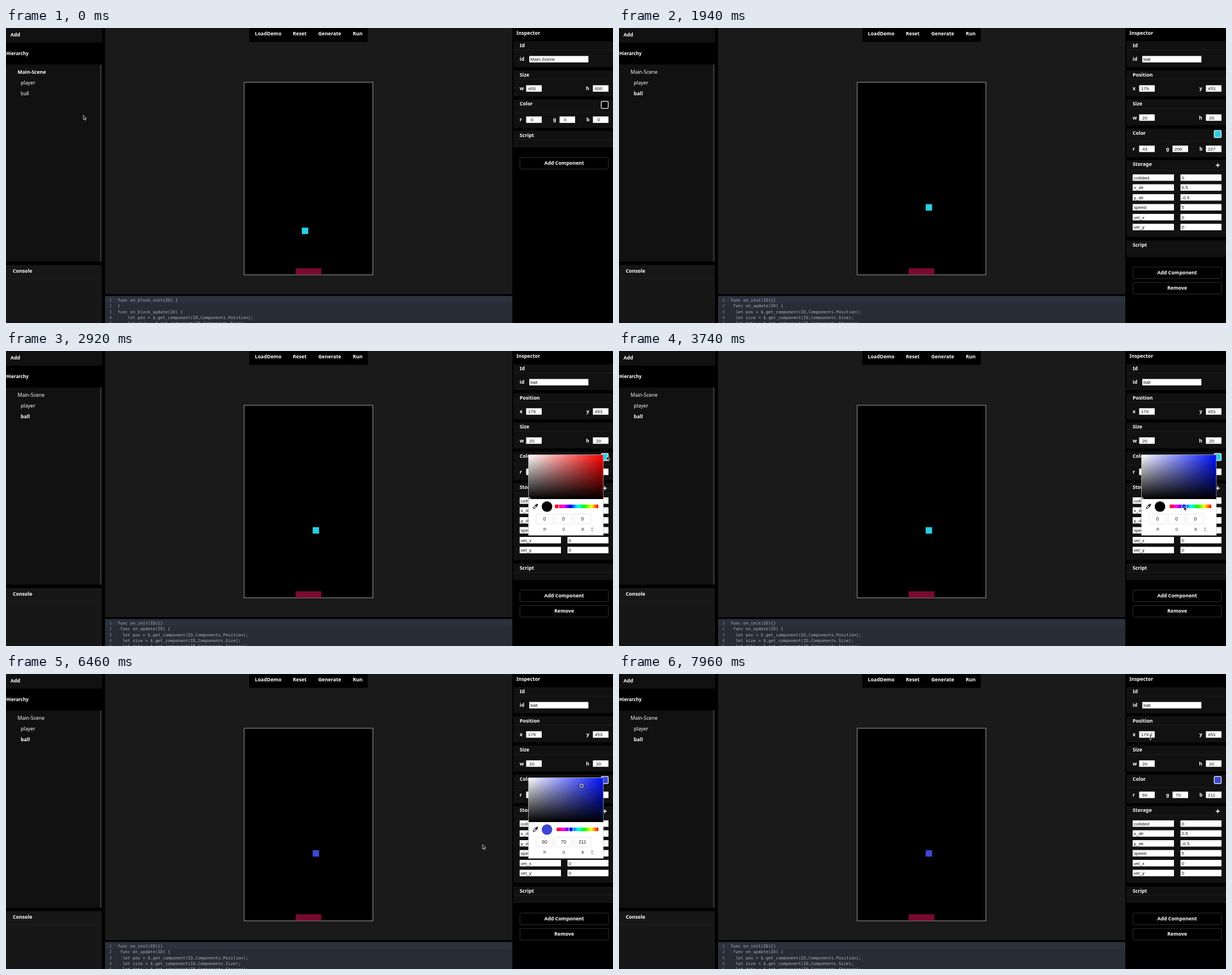
Write an HTML page that moves like this. It is 1073x522 px and loops after 8 s.

```html
<!DOCTYPE html>
<html lang="en">
<head>
<meta charset="utf-8">
<title>Block editor</title>
<style>
html, body { margin: 0; width: 100%; height: 100%; overflow: hidden; background: #000; }
svg { display: block; width: 100vw; height: 100vh; }
text { font: 8.75px "Noto Sans", "Open Sans", sans-serif; fill: #fff; white-space: pre; }
.bold { font-weight: 700; }
.small { font-size: 8.1px; font-weight: 700; }
.field { font: 8.1px "Liberation Sans", sans-serif; fill: #111; }
.value { font: 8.6px "Liberation Sans", sans-serif; fill: #222; }
.label { font: 7px "Liberation Sans", sans-serif; fill: #333; }
.code { font: 7.38px "DejaVu Sans Mono", monospace; fill: #abb2bf; }
.gutter { font: 7.38px "DejaVu Sans Mono", monospace; fill: #7d8799; }
</style>
</head>
<body>
<svg id="stage" viewBox="0 0 1073 522" preserveAspectRatio="none"></svg>
<script>
const LOOP = 8000, GRAB = 940, SELECT = 1065, DROP = 1940, APPEAR = 2420, OPEN = 2690;
const PICK = 4440, CLOSE = 6565, HOVER = 7940;

// The screen refreshes quickly until the ball is grabbed, then eight times a second.
function snap(t) {
  const gap = t < GRAB ? 40 : 125;
  return t < 220 ? 0 : GRAB + Math.floor((t - GRAB) / gap) * gap;
}

function glide(t, start, end, from, to) {
  const k = Math.max(0, Math.min(1, (t - start) / (end - start)));
  return from + (to - from) * k * k * (3 - 2 * k);
}

const hueAt = t => glide(t, 3440, 3690, 360, 236.05);
const shadeAt = t => t < PICK ? [0, 0]
  : [glide(t, 4815, 5065, .784, .7156), glide(t, 4815, 5065, .7725, .8275)];
const hueX = hue => 973.5 + 73.5 * (1 - hue / 360);
const shadeXY = ([s, v]) => [923.7 + s * 131, 184.3 + (1 - v) * 78];

// Each move: start, end, and the place the pointer glides to.
const MOVES = [
  [180, GRAB, 530, 359.5], [GRAB, 1190, 558, 340], [1190, DROP, 549.2, 318],
  [DROP, APPEAR, 1062, 186], [2940, 3400, 973.5, 275], [3740, PICK, ...shadeXY(shadeAt(PICK))],
  [5440, 6440, 842.7, 302], [CLOSE, 7565, 931, 175], [7600, HOVER, 939.5, 111.5]
];

function pointerAt(t) {
  if (t >= 3440 && t < 3740) return [hueX(hueAt(t)), 275];
  if (t >= PICK && t < 5440) return shadeXY(shadeAt(t));
  let place = [136.8, 154.5];
  for (const [start, end, x, y] of MOVES) {
    if (t < start) break;
    if (start === 3740) place = [hueX(hueAt(t)), 275];
    if (start === 5440) place = shadeXY(shadeAt(t));
    place = [glide(t, start, end, place[0], x), glide(t, start, end, place[1], y)];
  }
  return place;
}

function ballAt(t) {
  const [x, y] = pointerAt(Math.max(GRAB, Math.min(DROP - 1, t)));
  return [x - 1.4, y - .6];
}

function hsvToRgb(h, s, v) {
  return [5, 3, 1].map(n => {
    const k = (n + h / 60) % 6;
    return Math.round(255 * v * (1 - s * Math.max(0, Math.min(k, 4 - k, 1))));
  });
}

const css = rgb => `rgb(${rgb})`;
const box = (x, y, w, h, fill, extra = '') =>
  `<rect x="${x}" y="${y}" width="${w}" height="${h}" fill="${fill}" ${extra}/>`;
const text = (x, y, s, cls = 'bold', anchor = 'start') =>
  `<text x="${x}" y="${y + 3.1}" class="${cls}" text-anchor="${anchor}">${s}</text>`;
const field = (x, y, w, s) => box(x, y - 5.7, w, 11.4, '#fff') + text(x + 2, y - .2, s, 'field');
const number = (x, y, s) => box(x, y - 5.7, 27.5, 11.4, '#fff') + text(x + 10, y, s, 'field', 'middle');
const section = (title, y, height, line = 7.5) =>
  box(897, y - 7.7, 176, height, '#111') + box(897, y + line, 176, 1, '#1f1f1f') + text(908, y - .2, title);
const button = (y, s) =>
  box(908.5, y - 10, 156.5, 20.5, '#000', 'rx="2.5" stroke="#303030"') + text(986.7, y, s, 'bold', 'middle');
const pair = (y, a, va, b, vb) =>
  text(908, y, a) + number(919.5, y, va) + text(1031, y, b, 'bold', 'end') + number(1037.5, y, vb);

function editor(selected) {
  const code = selected
    ? ['func on_init(ID){}', ' func on_update(ID) {',
       '  let pos = $.get_component(ID,Components.Position);',
       '  let size = $.get_component(ID,Components.Size);',
       '  let data = $.get_component(ID,Components.Storage);']
    : ['func on_block_init(ID) {', '}', 'func on_block_update(ID) {',
       '    let pos = $.get_component(ID,Components.Position);',
       '    let size = $.get_component(ID,Components.Size);'];
  return box(175, 474, 720, 48, '#282c34') + box(175, 475.5, 720, 11, '#2b313d') +
    code.map((s, i) => {
      const y = 480.8 + i * 10.33;
      return text(187, y, i + 1, 'gutter', 'end') + text(197.3, y, s, 'code');
    }).join('');
}

function leftPanel(selected) {
  return box(0, 0, 170, 26, '#111') + text(8, 12.3, 'Add') + text(.5, 44.5, 'Hierarchy', 'small') +
    box(0, 64.5, 166, 349, '#111') + box(166, 64.5, 3.2, 349, '#2e2e2e') +
    text(20.5, 78, 'Main-Scene', selected ? '' : 'bold') + text(26, 97, 'player', '') +
    text(26, 115.5, 'ball', selected ? 'bold' : '') +
    box(0, 419.5, 169.5, 103, '#171717') + box(0, 443, 169.5, 1, '#1f1f1f') + text(12, 430, 'Console');
}

function scene(ball, color) {
  return box(175, 0, 720, 471, '#1a1a1a') + box(430, 0, 209.5, 24.5, '#000') +
    text(440, 9.5, 'LoadDemo') + text(507, 9.5, 'Reset') + text(552, 9.5, 'Generate') + text(613, 9.5, 'Run') +
    box(421, 96, 227.6, 340.8, '#000', 'stroke="#a0a0a0"') +
    box(512, 425.2, 45.5, 11.2, '#780a30') +
    box(ball[0] - 5.7, ball[1] - 5.7, 11.4, 11.4, css(color));
}

function colorSection(y, color) {
  return section('Color', y, 50.5, 14.5) +
    box(1052.2, y - 4.4, 12.3, 12.5, css(color), 'rx="1.5" stroke="#fff" stroke-width="1.2"') +
    ['r', 'g', 'b'].map((s, i) =>
      text(908 + i * 59, y + 28, s) + number(919.5 + i * 59, y + 28, color[i])).join('');
}

function inspector(selected, color) {
  const head = box(895, 0, 178, 522, '#000') + text(902.3, 8.7, 'Inspector') +
    section('Id', 31, 46) + text(908, 55, 'id') + field(925, 55.2, 104.5, selected ? 'ball' : 'Main-Scene');
  if (!selected) {
    return head + section('Size', 82.6, 46) + pair(107, 'w', 400, 'h', 600) +
      colorSection(134.2, color) + section('Script', 189.7, 29.5) + button(239, 'Add Component');
  }
  const storage = { collided: 0, x_dir: .5, y_dir: -.5, speed: 5, vel_x: 0, vel_y: 0 };
  return head + section('Position', 82.6, 46) + pair(107, 'x', 179, 'y', 453) +
    section('Size', 134.2, 46) + pair(158.5, 'w', 20, 'h', 20) +
    colorSection(185.8, color) + section('Storage', 241.3, 136, 9.5) +
    '<path d="M1055 242.7h7m-3.5-3.5v7" stroke="#fff" stroke-width="1.5"/>' +
    Object.entries(storage).map(([name, value], i) => {
      const y = 264.7 + i * 17.5;
      return field(908, y, 73, name) + field(992.5, y, 72.5, value);
    }).join('') +
    section('Script', 383.6, 29.5) + button(433, 'Add Component') + button(460.3, 'Remove');
}

const stops = colors =>
  colors.map((c, i) => `<stop offset="${i / (colors.length - 1)}" stop-color="${c}"/>`).join('');

function picker(hue, shade, color) {
  const pure = css(hsvToRgb(hue, 1, 1));
  const [x, y] = shadeXY(shade);
  const values = color.map((value, i) => {
    const center = 952 + i * 33.5;
    return box(center - 15, 288.5, 30, 17.5, '#fff', 'rx="1" stroke="#ddd" stroke-width=".7"') +
      text(center, 297, value, 'value', 'middle') + text(center + .5, 315, 'RGB'[i], 'label', 'middle');
  }).join('');
  return `<defs>
    <linearGradient id="sat">${stops(['#fff', pure])}</linearGradient>
    <linearGradient id="dark" x2="0" y2="1"><stop stop-opacity="0"/><stop offset="1"/></linearGradient>
    <linearGradient id="hues">${stops(['#f00', '#f0f', '#00f', '#0ff', '#0f0', '#ff0', '#f00'])}</linearGradient>
    <clipPath id="frame">${box(924, 184, 131.5, 78, '#000')}</clipPath></defs>` +
    box(923.5, 183.5, 132.5, 142.7, '#fff', 'stroke="#aaa" stroke-width=".6"') +
    box(924, 184, 131.5, 78, 'url(#sat)') + box(924, 184, 131.5, 78, 'url(#dark)') +
    `<g clip-path="url(#frame)">
      <circle cx="${x}" cy="${y}" r="3.4" fill="${css(color)}" stroke="#000" stroke-width="2.2"/>
      <circle cx="${x}" cy="${y}" r="3.1" fill="none" stroke="#fff" stroke-width="1.1"/></g>
    <circle cx="956.3" cy="275.3" r="9.3" fill="${css(color)}"/>
    <g transform="translate(936 275) rotate(45)"><path d="M-1.3-1v5l1.3 1.5 1.3-1.5v-5" fill="none" stroke="#111"/>
      <path d="M-2.7-1.5h5.4M0-4.5v3" stroke="#111" stroke-width="1.3"/>
      <circle cy="-4" r="1.7" fill="#111"/></g>` +
    box(973.5, 271.8, 73.5, 6.2, 'url(#hues)') +
    `<circle cx="${hueX(hue)}" cy="275" r="4" fill="${pure}" stroke="#fff" stroke-width="1.2"/>` + values +
    '<path d="M1034.6 314.5l1.5-1.6 1.5 1.6m-3 2.3l1.5 1.6 1.5-1.6" fill="none" stroke="#333" stroke-width=".9"/>';
}

function pointer(t) {
  if (t >= DROP && t < APPEAR) return '';
  const [x, y] = pointerAt(t);
  const at = shape => `<g transform="translate(${x} ${y})">${shape}</g>`;
  if (t < HOVER) {
    return at('<path d="M0 0v7.5l1.7-1.5 1.3 2.7 1.3-.6-1.2-2.7h2.3z" fill="#000" stroke="#fff" stroke-width=".8"/>');
  }
  const beam = 'M-1.8-4q1.8 0 1.8 1v6q0 1-1.8 1M1.8-4q-1.8 0-1.8 1v6q0 1 1.8 1';
  return '<path d="M939.3 105.8l1.9-2.3 1.9 2.3zm0 1.9l1.9 2.3 1.9-2.3z" fill="#666"/>' +
    at(`<path d="${beam}" fill="none" stroke="#fff" stroke-width="2"/><path d="${beam}" fill="none" stroke="#000" stroke-width=".9"/>`);
}

function render(t) {
  const selected = t >= SELECT;
  const hue = hueAt(t), shade = shadeAt(t), chosen = hsvToRgb(hue, ...shade);
  const ballColor = t >= PICK ? chosen : [43, 206, 227];
  return box(0, 0, 1073, 522, '#000') + leftPanel(selected) + scene(ballAt(t), ballColor) +
    editor(selected) + inspector(selected, selected ? ballColor : [0, 0, 0]) +
    (t >= OPEN && t < CLOSE ? picker(hue, shade, chosen) : '') + pointer(t);
}

const stage = document.getElementById('stage');
let shown = -1;
function tick() {
  const t = snap(performance.now() % LOOP);
  if (t !== shown) stage.innerHTML = render(shown = t);
  requestAnimationFrame(tick);
}
tick();
</script>
</body>
</html>
```
